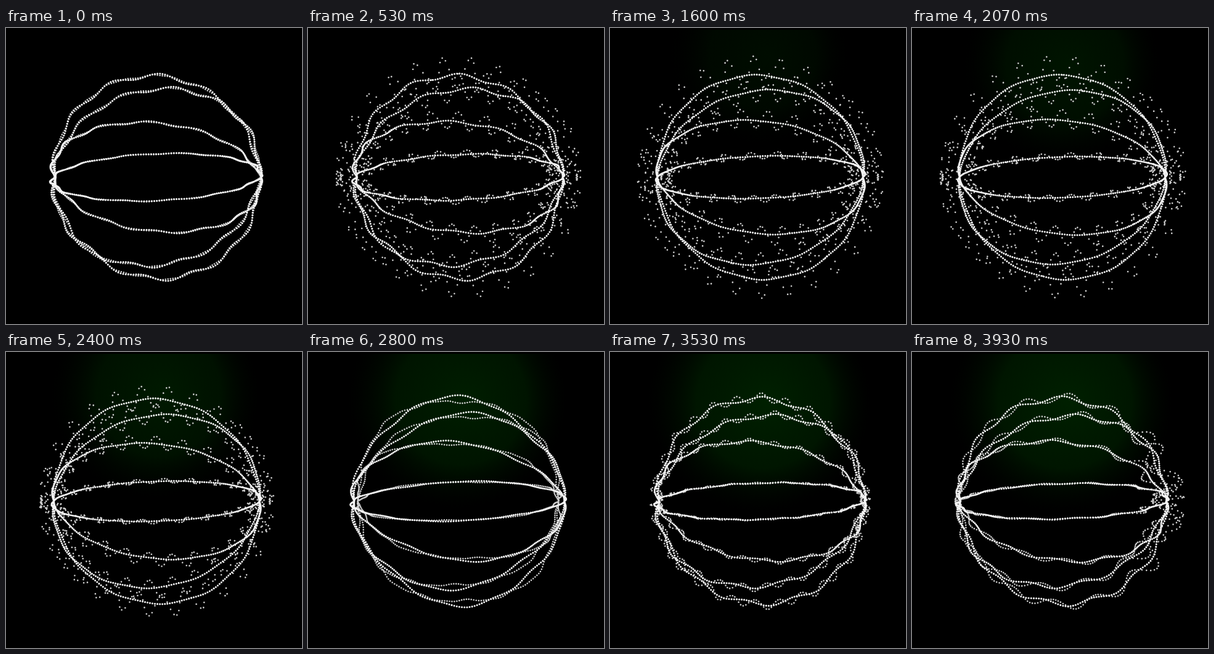
An HTML page with a canvas that plays this animation: 480 px wide and 480 px high, repeating every 3990 ms.

```html
<!DOCTYPE html>
<html>
<head>
<meta charset="utf-8">
<style>
html, body { margin: 0; width: 100%; height: 100%; overflow: hidden; background: #000; }
canvas { display: block; }
</style>
</head>
<body>
<canvas id="stage" width="480" height="480"></canvas>
<script>
const ctx = document.getElementById('stage').getContext('2d');
const LOOP = 3990, STEP = LOOP / 60;
const CX = 244, CY = 242, R = 169, RINGS = 4, DOTS = 260, YAW = 0.17;
const { PI, sin, cos, abs, min, max } = Math;
const TAU = PI * 2;

// Smooth rise from 0 to 1 between two times
function ease(t, from, to) {
  const p = min(1, max(0, (t - from) / (to - from)));
  return p * p * (3 - 2 * p);
}

function drawGlow(level) {
  const x = 242, y = 20 + 60 * level;
  const g = ctx.createRadialGradient(x + 15, y, 0, x, y, 120 + 60 * level);
  g.addColorStop(0, `rgba(0,32,0,${level})`);
  g.addColorStop(0.6, `rgba(0,24,0,${level * 0.9})`);
  g.addColorStop(1, 'rgba(0,8,0,0)');
  ctx.fillStyle = g;
  ctx.fillRect(0, 3, 480, 470);
}

// Great circles through one horizontal axis; offset depends on the angle from the right pole
function drawRings(turn, offset, size, color) {
  ctx.fillStyle = color;
  ctx.beginPath();
  for (let k = 0; k < RINGS; k++) {
    const phi = turn + k * PI / RINGS;
    for (let i = 0; i < DOTS; i++) {
      const a = (i / DOTS - 0.5) * TAU, r = R + offset(abs(a));
      const x = CX + r * (cos(a) * cos(YAW) - sin(a) * sin(phi) * sin(YAW));
      const y = CY - r * sin(a) * cos(phi);
      ctx.moveTo(x + size, y);
      ctx.arc(x, y, size, 0, TAU);
    }
  }
  ctx.fill();
}

function render(t) {
  const turn = (13.2 - 3.4 * t / LOOP) * PI / 180;

  // Fine ripple of the solid line, with a slow swell that splits the two strands
  const split = ease(t, 2450, 2800) - ease(t, 2800, 3300);
  const ripple = 2.4 + 1.6 * cos(TAU * t / LOOP);
  const phase = 1.3 - 0.7 * cos(TAU * t / 3200);
  const line = a => ripple * cos(13 * a - phase) + 4.5 * split * cos(4.4 * a - 0.63);

  // Loud spray with two bursts, then a quiet one, then a pulse from the right pole
  const burst = t > 535 && t < 1595 ? sin(PI * (t - 535) / 530) ** 2 : 0;
  const loud = 30 * ease(t, 0, 500) * (1 - ease(t, 2150, 2800)) + 27 * burst;
  const amp = 1 + loud + 7 * ease(t, 2800, 3400);
  const count = 26.95 + 0.8 * sin((t - 1060) / 250) - 11.3 * ease(t, 3530, 3930);
  const shift = 3.1 * ease(t, 2500, 3400);
  const reach = 1.05 * min(1, max(0, (t - 3740) / 180));
  const spray = a => {
    const near = reach && max(0, 1 - a / reach);
    const s = (amp + 25 * near) * cos(count * a - shift);
    return (s < 0 ? s * 0.7 : s) + line(a) * (0.4 - 1.4 * split);
  };

  ctx.fillStyle = '#000';
  ctx.fillRect(0, 0, 480, 480);
  drawGlow(ease(t, 400, 3200));
  drawRings(turn, spray, 1.35, '#ccc');
  drawRings(turn, line, 1.55, '#f4f4f4');
}

const start = performance.now();
function tick() {
  const t = (performance.now() - start) % LOOP;
  render(Math.floor(t / STEP + 0.01) * STEP % LOOP);
  requestAnimationFrame(tick);
}
tick();
</script>
</body>
</html>
```
